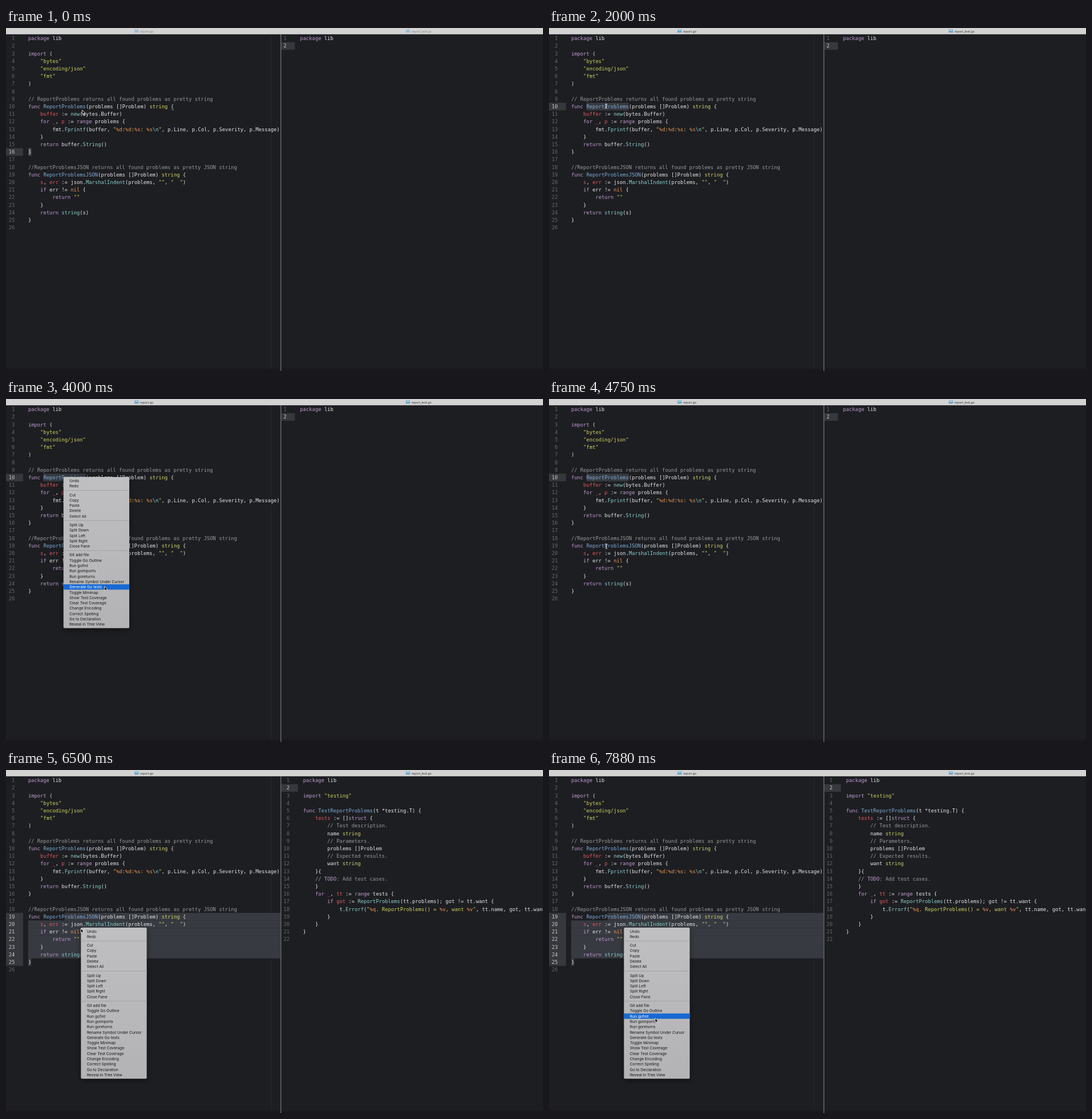
Write an HTML page with a canvas that moves like this. It is 936 px wide and 598 px high and loops after 8000 ms.

```html
<!DOCTYPE html>
<html lang="en">
<head>
<meta charset="utf-8">
<title>Go test generation</title>
<style>
html, body { margin: 0; width: 100%; height: 100%; overflow: hidden; background: #1d1f21; }
canvas { display: block; }
</style>
</head>
<body>
<canvas id="stage" width="936" height="598"></canvas>
<script>
const ctx = document.getElementById('stage').getContext('2d');
const LOOP = 8000, STEP = 125;
const ROW = 13.2, TOP = 11.5, CHAR = 5.286;
const MONO = '8.78px "DejaVu Sans Mono", monospace';
const UI = 'Inter, sans-serif';
const COLOR = {
  bg: '#1d1e22', text: '#e6e6e6', comment: '#969896', string: '#ced45c', keyword: '#c09bd0',
  type: '#d2d765', call: '#8ccfcb', func: '#7fabd6', variable: '#e2575c', constant: '#ee9350',
  number: '#66686c', active: '#c8cacc', gutter: '#36383d', selection: '#373a41'
};

const reportCode = String.raw`package lib

import (
    "bytes"
    "encoding/json"
    "fmt"
)

// ReportProblems returns all found problems as pretty string
func ReportProblems(problems []Problem) string {
    buffer := new(bytes.Buffer)
    for _, p := range problems {
        fmt.Fprintf(buffer, "%d:%d:%s: %s\n", p.Line, p.Col, p.Severity, p.Message)
    }
    return buffer.String()
}

//ReportProblemsJSON returns all found problems as pretty JSON string
func ReportProblemsJSON(problems []Problem) string {
    s, err := json.MarshalIndent(problems, "", "  ")
    if err != nil {
        return ""
    }
    return string(s)
}
`.split('\n');

const emptyTest = ['package lib', ''];
const fullTest = String.raw`package lib

import "testing"

func TestReportProblems(t *testing.T) {
    tests := []struct {
        // Test description.
        name string
        // Parameters.
        problems []Problem
        // Expected results.
        want string
    }{
    // TODO: Add test cases.
    }
    for _, tt := range tests {
        if got := ReportProblems(tt.problems); got != tt.want {
            t.Errorf("%q. ReportProblems() = %v, want %v", tt.name, got, tt.want)
        }
    }
}
`.split('\n');

const menuItems = `Undo|Redo|-|Cut|Copy|Paste|Delete|Select All|-|Split Up|Split Down|Split Left|Split Right|Close Pane|-|Git add file|Toggle Go Outline|Run gofmt|Run goimports|Run goreturns|Rename Symbol Under Cursor|Generate Go tests|Toggle Minimap|Show Test Coverage|Clear Test Coverage|Change Encoding|Correct Spelling|Go to Declaration|Reveal in Tree View`.split('|');

const tokens = new RegExp([
  '(?<comment>//.*)', '(?<string>"[^"]*")', '(?<func>(?<=func )\\w+)',
  '(?<keyword>\\b(?:package|import|func|for|range|return|if|struct)\\b)',
  '(?<constant>\\bnil\\b)', '(?<call>\\w+(?=\\())', '(?<type>\\bstring\\b)',
  '(?<variable>\\b\\w+(?=(?:, \\w+)* :=))'
].join('|'), 'g');

// Pointer path: time, x, y
const path = [
  [0, 133, 143], [125, 127, 142], [500, 99, 137], [2625, 100, 136], [2875, 135, 235],
  [3125, 171, 321.5], [3375, 172, 326], [3875, 172, 327], [4500, 170, 325], [4625, 150, 314],
  [4750, 100, 257], [5500, 100, 257], [5625, 113, 283], [5750, 134, 316], [5875, 134, 330],
  [6000, 132, 334], [6125, 132, 334], [6250, 130, 276], [7000, 131, 277], [7250, 150, 335],
  [7500, 172, 398], [7750, 183, 427], [7875, 185, 432.6]
];

function fill(color, x, y, w, h) {
  ctx.fillStyle = color;
  ctx.fillRect(x, y, w, h);
}

function write(text, x, y, color, font, align = 'left') {
  ctx.font = font;
  ctx.textAlign = align;
  ctx.fillStyle = color;
  ctx.fillText(text, x, y);
}

const rowTop = row => TOP + (row - 1) * ROW;
const between = (t, from, to) => t >= from && t < to;

function pointerAt(t) {
  const next = path.findIndex(key => key[0] > t);
  if (next < 0) return path.at(-1).slice(1);
  const [a, b] = [path[next - 1], path[next]];
  const k = (t - a[0]) / (b[0] - a[0]);
  return [1, 2].map(i => a[i] + (b[i] - a[i]) * k);
}

function drawLine(line, x, y) {
  const put = (text, col, color) => write(text, x + col * CHAR, y, color, MONO);
  let end = 0;
  for (const match of line.matchAll(tokens)) {
    put(line.slice(end, match.index), end, COLOR.text);
    const kind = Object.keys(match.groups).find(name => match.groups[name] !== undefined);
    let col = match.index;
    for (const part of match[0].split(/(%\w|\\n|TODO)/)) {
      const color = kind === 'string' && part[0] === '%' ? COLOR.constant
        : part === '\\n' ? COLOR.call : part === 'TODO' ? COLOR.keyword : COLOR[kind];
      put(part, col, color);
      col += part.length;
    }
    end = col;
  }
  put(line.slice(end), end, COLOR.text);
}

function drawPane(lines, left, right, numberX, codeX, activeRows, selection) {
  ctx.save();
  ctx.beginPath();
  ctx.rect(left, TOP - 1, right - left, 590);
  ctx.clip();
  const [first, last] = activeRows;
  fill(COLOR.gutter, left, rowTop(first), codeX - 9 - left, (last - first + 1) * ROW);
  if (selection) {
    const [startRow, startCol, endRow, endCol] = selection;
    for (let row = startRow; row <= endRow; row++) {
      const x = codeX + (row === startRow ? startCol * CHAR : 0);
      const end = row === endRow ? codeX + endCol * CHAR : right;
      fill(COLOR.selection, x, rowTop(row), end - x, ROW + 0.1);
    }
  }
  lines.forEach((line, i) => {
    const y = rowTop(i + 1) + 9.6;
    const active = i + 1 >= first && i + 1 <= last;
    write(i + 1, numberX, y, active ? COLOR.active : COLOR.number, MONO, 'right');
    drawLine(line, codeX, y);
  });
  ctx.restore();
}

function drawTitle(text, x, focused) {
  ctx.globalAlpha = focused ? 1 : 0.5;
  fill('#5b9cc4', x, 2.6, 7, 5.2);
  fill('#b5dcef', x + 0.8, 3.4, 5.4, 1.8);
  write(text, x + 9.6, 7.5, '#333', '5.35px ' + UI);
  ctx.globalAlpha = 1;
}

function drawMenu(x, y, pointer, opacity, lit) {
  const height = 263.5, width = 114.7, pitch = 9.3, gap = 5.95;
  ctx.save();
  ctx.globalAlpha = opacity;
  const shade = ctx.createLinearGradient(0, y, 0, y + height);
  shade.addColorStop(0, '#bfbfc1');
  shade.addColorStop(1, '#b3b2b5');
  ctx.fillStyle = shade;
  ctx.shadowColor = 'rgba(0,0,0,.5)';
  ctx.shadowBlur = 10;
  ctx.shadowOffsetY = 3;
  ctx.beginPath();
  ctx.roundRect(x, y, width, height, 2);
  ctx.fill();
  ctx.shadowColor = 'transparent';
  let top = y + 1.75;
  for (const item of menuItems) {
    if (item === '-') {
      fill('#a0a0a2', x, top + gap / 2 - 0.4, width, 0.9);
      top += gap;
      continue;
    }
    const hover = lit && pointer[0] > x + 2 && pointer[1] >= top && pointer[1] < top + pitch;
    if (hover) fill('#1769d2', x, top, width, pitch);
    write(item, x + 10.3, top + 7.1, hover ? '#fff' : '#151515', '6.68px ' + UI);
    top += pitch;
  }
  ctx.restore();
}

function drawPointer([x, y], beam) {
  ctx.save();
  ctx.translate(x, y);
  ctx.lineWidth = 0.9;
  ctx.strokeStyle = '#e8e8e8';
  ctx.fillStyle = '#000';
  const shape = beam
    ? 'M-1.8-4Q0-4 0-3Q0-4 1.8-4M0-3V3M-1.8 4Q0 4 0 3Q0 4 1.8 4M-1 1H1'
    : 'M0 0V7.6L1.8 6L3 8.8L4.3 8.2L3.1 5.5H5.5Z';
  const outline = new Path2D(shape);
  if (!beam) ctx.fill(outline);
  ctx.stroke(outline);
  ctx.restore();
}

function leftState(t) {
  if (t < 1750) return { rows: [16, 16] };
  if (t < 1875) return { rows: [10, 10] };
  if (t < 5625) return { rows: [10, 10], selection: [10, 5, 10, 19] };
  if (t < 5750) return { rows: [19, 21], selection: [19, 12, 21, 14] };
  if (t < 5875) return { rows: [19, 23], selection: [19, 12, 23, 5] };
  return { rows: [19, 25], selection: [19, 12, 25, 1] };
}

function draw(time) {
  const t = Math.floor(time / STEP) * STEP;
  const pointer = pointerAt(t);
  const focused = t >= 1750;
  const left = leftState(t);

  fill(COLOR.bg, 0, 0, 936, 598);
  fill('#25272b', 462, 11, 1, 583);
  if (!focused) {
    fill('#4a4d52', 39, rowTop(16), 5.3, ROW);
    fill('#8a8c8e', 288, rowTop(10) + 12, 5, 0.8);
  }
  drawPane(reportCode, 0, 478.5, 15.3, 38.7, left.rows, left.selection);
  if (t < 4875) drawPane(emptyTest, 480, 936, 489, 512.5, [2, 2]);
  else drawPane(fullTest, 480, 936, 494.3, 517.8, [2, 2]);
  fill('#19181c', 0, 594, 936, 4);
  fill('#8d8e90', 478.6, 11, 1, 587);

  fill('#d3d3d3', 0, 0, 936, 11);
  fill('#aaa', 0, 10.5, 936, 0.6);
  drawTitle('report.go', 224, focused);
  drawTitle('report_test.go', 697, focused);

  if (between(t, 2375, 4500)) {
    drawMenu(100.2, 136.1, pointer, t < 4250 ? 1 : t < 4375 ? 0.7 : 0.3, t !== 4125);
  }
  if (t >= 6375) drawMenu(130.6, 274.7, pointer, 1, true);
  drawPointer(pointer, between(t, 1750, 2375) || between(t, 4500, 6375));
}

function tick() {
  draw(performance.now() % LOOP);
  requestAnimationFrame(tick);
}
tick();
</script>
</body>
</html>
```
